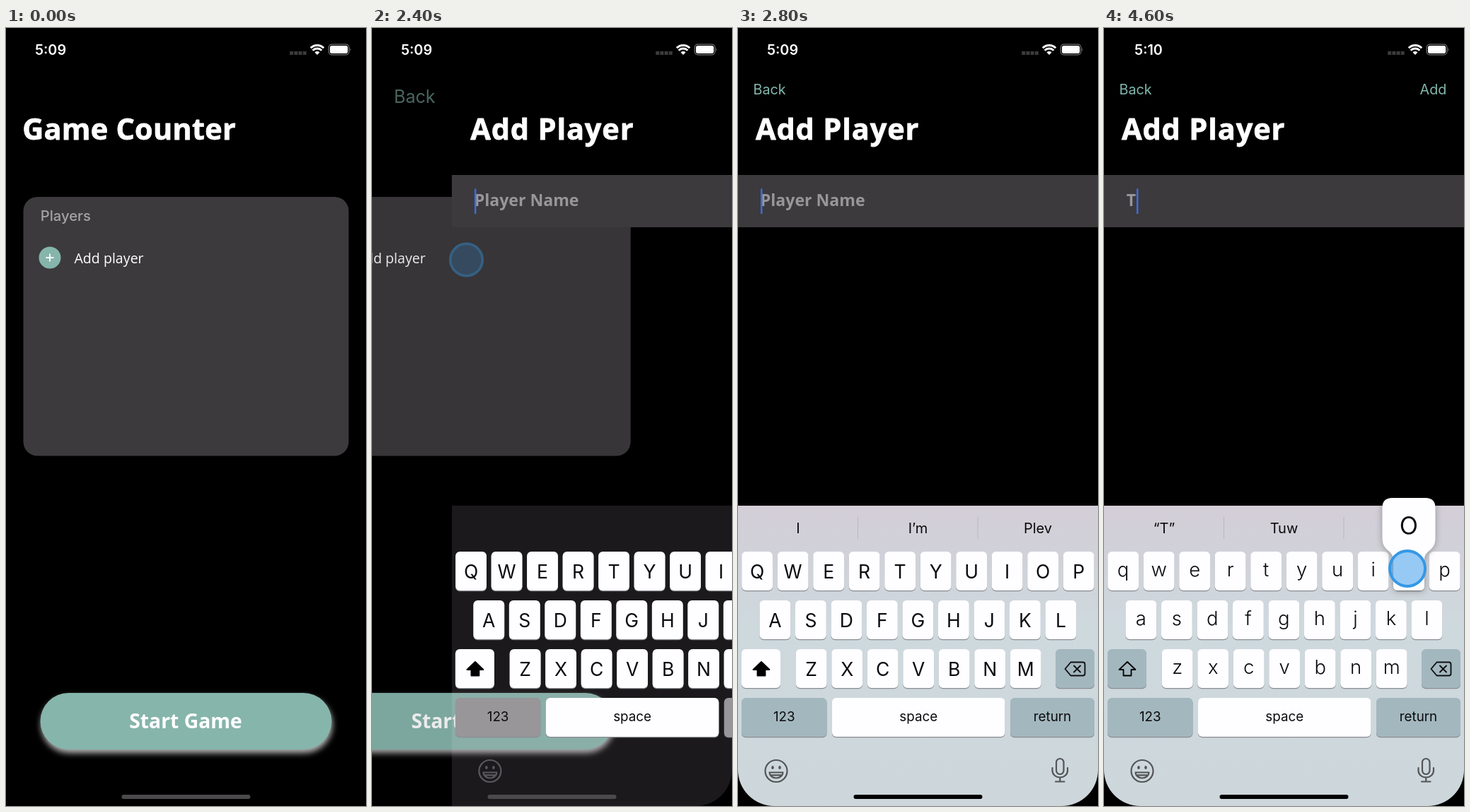
Write an HTML page that moves like this. It is 509 px wide and 1101 px high and loops after 5000 ms.

```html
<!DOCTYPE html>
<html lang="en">
<head>
<meta charset="utf-8">
<title>Game Counter</title>
<style>
html, body { margin: 0; width: 100%; height: 100%; overflow: hidden; background: #000; }
svg { display: block; width: 100%; height: 100%; }
text { font: 400 20px Inter, sans-serif; fill: #fff; }
.mid { text-anchor: middle; }
.round { font-family: "Open Sans", sans-serif; font-weight: 700; }
.title { font-size: 41.5px; stroke: #fff; stroke-width: .8; stroke-linejoin: round; }
.panel { fill: #3c3a3c; }
.accent { fill: #86b5ab; }
.link { font-size: 19.8px; fill: #82b7ac; }
.faint { fill: #989699; }
#start { filter: drop-shadow(1px 5px 4.5px rgba(255, 255, 255, .7)); }
#board { fill: rgba(250, 235, 255, .105); }
.light #board { fill: url(#tray); }
.lip { fill: #898d91; }
.cap { fill: #fefdff; }
.fn .cap { fill: #989699; }
.light .fn .cap { fill: #a3b7be; }
#keys text, #hints text, .pop text { fill: #0b0b0d; }
#keys .letter { font-size: 26.5px; }
.lower #keys .letter { font-size: 27.5px; font-weight: 300; transform: translateY(-2.5px); }
#keys .word { font-size: 18.8px; }
#hints { visibility: hidden; }
.light #hints { visibility: visible; }
#hints path { stroke: #b9b7be; }
.icon { fill: none; stroke: #5a585c; stroke-width: 2.2; stroke-linecap: round; stroke-linejoin: round; }
.light .icon { stroke: #535558; }
.icon .solid { fill: #5a585c; stroke: none; }
.light .icon .solid { fill: #535558; }
#arrow { fill: #000; stroke: #000; stroke-width: 1.8; stroke-linejoin: round; }
.lower #arrow { fill: none; }
#erase { fill: none; stroke: #101012; stroke-width: 1.9; stroke-linejoin: round; stroke-linecap: round; }
#bar { fill: #4b494c; }
.light #bar { fill: #000; }
.pop path { fill: #fefdff; filter: drop-shadow(0 1px 5px rgba(0, 0, 0, .3)); }
.pop text { font-size: 46px; font-weight: 300; }
.tap { fill: rgba(50, 150, 235, .5); stroke: #3498e6; stroke-width: 4; }
</style>
</head>
<body>
<svg id="stage" viewBox="0 0 509 1101">
  <defs>
    <linearGradient id="tray" x2="0" y2="1">
      <stop stop-color="#d3ced7"/><stop offset=".2" stop-color="#d0d2d9"/>
      <stop offset=".4" stop-color="#ced9de"/><stop offset="1" stop-color="#cdd7db"/>
    </linearGradient>
    <linearGradient id="edge">
      <stop offset=".91" stop-color="#fff"/><stop offset=".995" stop-color="#000"/>
    </linearGradient>
    <mask id="fade" maskUnits="userSpaceOnUse" x="0" y="0" width="509" height="300">
      <rect width="509" height="300" fill="url(#edge)"/>
    </mask>
    <clipPath id="screen"><rect y="-60" width="509" height="1161" rx="51"/></clipPath>
  </defs>
  <rect width="509" height="1101"/>

  <g id="home">
    <rect class="panel" x="24.5" y="239" width="460" height="366.5" rx="20"/>
    <text x="48.8" y="272.5" style="font-size:20.2px;font-weight:500;fill:#a5a3a6">Players</text>
    <circle class="accent" cx="62" cy="325" r="15.5"/>
    <path d="M56.5 325h11M62 319.5v11" stroke="#fff" stroke-width="1.8"/>
    <text class="round" x="96.4" y="333" style="font-size:19.6px;font-weight:500">Add player</text>
    <rect id="start" class="accent" x="48.5" y="941" width="412" height="80" rx="40"/>
    <text class="round mid" x="254" y="991" style="font-size:28.3px">Start Game</text>
  </g>
  <rect id="dim" width="509" height="1101"/>

  <g clip-path="url(#screen)">
    <g id="form">
      <rect class="panel" y="208" width="509" height="74"/>
      <text id="entry" class="round faint" x="31.8" y="251.5" style="font-size:23.1px"></text>
      <rect id="caret" y="227.5" width="2.5" height="35.5" fill="#3f6bdc"/>
      <rect id="board" y="676" width="509" height="425"/>
      <g id="hints"><path d="M169.5 692v31M339 692v31"/></g>
      <g id="keys"></g>
      <path id="arrow" d="M33 897l11.5 11h-6v8.5h-11v-8.5h-6z"/>
      <path id="erase" d="M470.5 897.5h17q3 0 3 3v13q0 3-3 3h-17l-8-9.5zM475 902.5l9 9m0-9l-9 9"/>
      <g class="icon">
        <circle cx="54" cy="1051.5" r="15.5"/>
        <path d="M44.5 1053.5h19a9.5 8 0 0 1-19 0zM47 1057.3h14"/>
        <ellipse class="solid" cx="49" cy="1046.5" rx="1.8" ry="2.5"/>
        <ellipse class="solid" cx="59" cy="1046.5" rx="1.8" ry="2.5"/>
        <rect x="450" y="1034" width="10.5" height="22" rx="5.25"/>
        <path d="M444.5 1047v4a10.75 9.5 0 0 0 21.5 0v-4M455.25 1060.5v6M449 1066.5h12.5"/>
      </g>
    </g>
  </g>

  <text id="oldTitle" class="round title" style="letter-spacing:.2px">Game Counter</text>
  <g mask="url(#fade)">
    <text id="newTitle" class="round title" y="158" style="letter-spacing:.85px">Add Player</text>
  </g>
  <text id="back" class="link">Back</text>
  <text id="add" class="link" x="446.5" y="93.5">Add</text>

  <text id="clock" class="mid" x="63" y="37.8" style="font-size:19.8px;font-weight:600"></text>
  <path d="M401.2 35.5h23.5" stroke="#3c3a3d" stroke-width="5" stroke-dasharray="5 1.2"/>
  <g fill="none" stroke="#fff" stroke-width="3">
    <path d="M433.7 31.7a8.9 8.9 0 0 1 12.6 0M430.8 28.3a13 13 0 0 1 18.4 0"/>
    <path d="M440 38l-3.5-3.5a5 5 0 0 1 7 0z" fill="#fff" stroke="none"/>
    <rect x="456.2" y="23.2" width="28.8" height="14.6" rx="4.5" stroke="#77757a" stroke-width="1.2"/>
    <rect x="458" y="25" width="25.2" height="11" rx="2.8" fill="#fff" stroke="none"/>
    <path d="M486.5 28.2q2 2.3 0 4.6z" fill="#77757a" stroke="none"/>
  </g>
  <rect id="bar" x="163.5" y="1085" width="182" height="6" rx="3"/>
  <g id="overlay"></g>
</svg>
<script>
const $ = id => document.getElementById(id);
const clamp = v => Math.max(0, Math.min(1, v));
const place = (el, x, y = 0, scale = 1) =>
  el.setAttribute('transform', `translate(${x} ${y}) scale(${scale})`);
const label = (x, y, text, cls = '') => `<text class="mid ${cls}" x="${x}" y="${y}">${text}</text>`;

const PITCH = 50.5, KEY = 43.8;
const key = (x, y, w, content = '', cls = '') => `<g class="${cls}">
  <rect class="lip" x="${x}" y="${y + 1.3}" width="${w}" height="55" rx="6"/>
  <rect class="cap" x="${x}" y="${y}" width="${w}" height="55" rx="6"/>${content}</g>`;
const word = (x, w, text, cls) => key(x, 948, w, label(x + w / 2, 981, text, 'word'), cls);
const row = (letters, x, y) => [...letters].map((c, i) =>
  key(x + i * PITCH, y, KEY, label(x + i * PITCH + KEY / 2, y + 37.5, c, 'letter'))).join('');

$('keys').innerHTML =
  row('QWERTYUIOP', 5.25, 741) + row('ASDFGHJKL', 30.5, 810) + row('ZXCVBNM', 81.8, 879) +
  key(5, 879, 55, '', 'shift') + key(449, 879, 55, '', 'fn') +
  word(5, 120.5, '123', 'fn') + word(133, 244.5, 'space') + word(385, 119, 'return', 'fn');
$('hints').innerHTML += [85, 254.5, 424].map(x => label(x, 714.5, '')).join('');

const balloon = (x, c) => `<g class="pop" transform="translate(${x})">
  <path d="M-21.9 790V753C-21.9 738-37.5 741-37.5 722V679q0-14 14-14h47q14 0 14 14V722C37.5 741 21.9 738 21.9 753V790q0 6-6 6h-31.8q-6 0-6-6z"/>
  ${label(0, 715.5, c)}</g>`;

const taps = [
  { x: 133.5, y: 328, down: 1690, up: 2100 },
  { x: 239.5, y: 765, down: 4050, up: 4195, key: 229.4, letter: 'T' },
  { x: 429, y: 765, down: 4590, up: 6000, key: 431, letter: 'o' }
];
$('overlay').innerHTML = taps.map(p =>
  (p.letter ? balloon(p.key, p.letter) : '') + '<circle class="tap" r="25"/>').join('');
const circles = document.querySelectorAll('.tap');
const letters = document.querySelectorAll('.letter');
const hints = document.querySelectorAll('#hints text');
const shift = document.querySelector('.shift');

// Critically damped spring for the push, settled once the keyboard lights up.
function push(t) {
  if (t < 2212.5) return 0;
  if (t >= 2750) return 1;
  const s = (t - 2212.5) * 0.01515;
  return 1 - (1 + s) * Math.exp(-s);
}

function caretAlpha(t) {
  if (t < 2800 || t >= 4195) return 1;
  const phase = (t - 2800) % 900;
  return phase < 400 ? Math.abs(phase - 200) / 200 : 1;
}

function render(t) {
  const p = push(t), q = 1 - p;
  const typed = t >= 4195, cut = t >= 3195;

  place($('home'), -152.7 * p);
  $('dim').setAttribute('opacity', 0.1 * p);
  $('home').style.visibility = p < 1 ? 'visible' : 'hidden';
  place($('form'), 509 * q);
  $('form').style.visibility = p > 0 ? 'visible' : 'hidden';

  place($('oldTitle'), 23.3 + 3.2 * p, 158 - 52 * p, 1 - 0.47 * p);
  $('oldTitle').style.opacity = clamp(1 - 1.3 * p);
  $('newTitle').setAttribute('x', 25 + 485 * q + 135 * q * q);
  $('newTitle').style.opacity = clamp(1.65 * p);
  place($('back'), 21.5 + 43 * q, 93.5 + 56 * q, 1 + 1.2 * q);
  $('back').style.opacity = clamp(2 * p - 1);
  $('add').style.opacity = +cut;
  $('clock').textContent = cut ? '5:10' : '5:09';

  $('stage').classList.toggle('light', t >= 2750);
  $('stage').classList.toggle('lower', typed);
  shift.classList.toggle('fn', typed);
  letters.forEach(el => {
    const c = el.textContent;
    el.textContent = typed ? c.toLowerCase() : c.toUpperCase();
  });
  const guesses = t >= 4295 ? ['“T”', 'Tuw', 'The'] : ['I', 'I’m', 'Plev'];
  hints.forEach((el, i) => el.textContent = guesses[i]);
  $('entry').textContent = typed ? 'T' : 'Player Name';
  $('caret').setAttribute('x', typed ? 46 : 32);
  $('caret').style.opacity = caretAlpha(t);

  taps.forEach((tap, i) => {
    const fade = clamp((t - tap.up) / 400) ** 2;
    place(circles[i], tap.x, tap.y, 1 - 0.16 * fade);
    circles[i].style.opacity = t < tap.down ? 0 : 1 - fade;
    if (tap.letter) {
      circles[i].previousElementSibling.style.visibility =
        t >= tap.down && t < tap.up ? 'visible' : 'hidden';
    }
  });
}

function frame() {
  render(performance.now() % 5000);
  requestAnimationFrame(frame);
}
frame();
</script>
</body>
</html>
```
